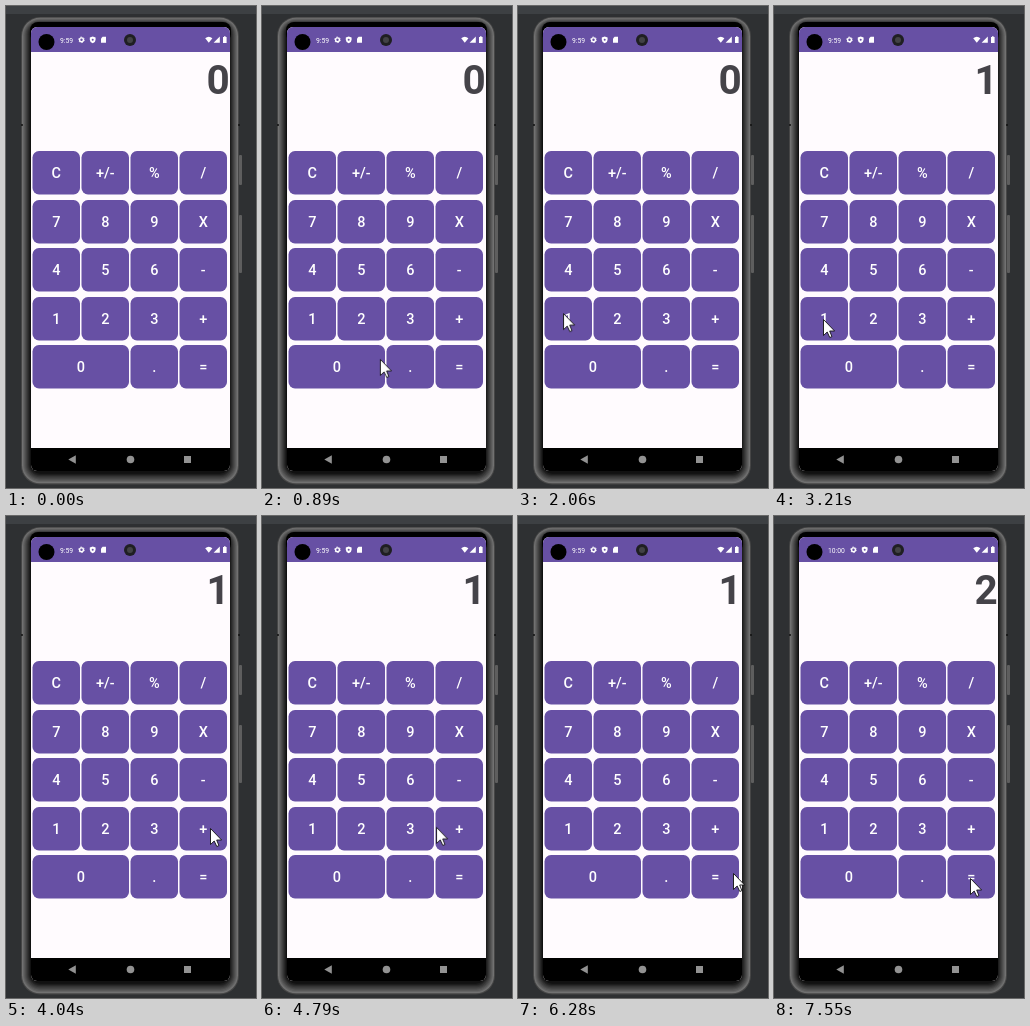
An HTML page for the animation above (8 s loop, 250x482 px).

```html
<!DOCTYPE html>
<html lang="en">
<head>
<meta charset="utf-8">
<title>Calculator</title>
<style>
html, body { margin: 0; width: 100%; height: 100%; overflow: hidden; background: #2e3032; }
svg { display: block; width: 250px; height: 482px; font-family: Roboto, sans-serif; }
#keys rect { fill: #6750a4; }
#keys text { fill: #fff; font-size: 14.5px; font-weight: 500; text-anchor: middle; }
.display { fill: #454349; font-size: 40.5px; font-weight: 700; text-anchor: end; }
.status { fill: #fff; font-size: 6.8px; }

.zero, .one, .two, .early, .late, .touch, .icons { animation: 8s step-end infinite; }
.zero { animation-name: zero; }
.one { animation-name: one; }
.two { animation-name: two; }
.early { animation-name: early; }
.late { animation-name: late; }
.touch { animation-name: touch; }
.icons { animation-name: icons; }
.cursor { animation: move 8s linear infinite; }

@keyframes zero { 0% { opacity: 1 } 40.125%, 100% { opacity: 0 } }
@keyframes one { 0% { opacity: 0 } 40.125% { opacity: 1 } 93.5%, 100% { opacity: 0 } }
@keyframes two { 0% { opacity: 0 } 93.5%, 100% { opacity: 1 } }
@keyframes early { 0% { opacity: 1 } 86.75%, 100% { opacity: 0 } }
@keyframes late { 0% { opacity: 0 } 86.75%, 100% { opacity: 1 } }
@keyframes icons { 0% { transform: none } 86.75%, 100% { transform: translateX(4px) } }
@keyframes touch {
  0%, 40.125%, 55.625%, 68.375%, 93.5%, 100% { opacity: 0 }
  38.5%, 53.125%, 66.75%, 91.875% { opacity: 1 }
}
@keyframes move {
  0%, 7.74% { transform: translate(216px, 520px) }
  7.75% { transform: translate(216px, 470px); animation-timing-function: cubic-bezier(.3, .5, .6, .9) }
  11.125% { transform: translate(118px, 353px); animation-timing-function: ease-out }
  12.875%, 16.125% { transform: translate(106px, 345px); animation-timing-function: ease-in-out }
  23.75% { transform: translate(40px, 296px) }
  25.75% { transform: translate(45px, 307px) }
  27.25%, 28.25% { transform: translate(49px, 316px) }
  30.625%, 43.5% { transform: translate(49px, 313px); animation-timing-function: ease-in }
  47.25% { transform: translate(132px, 324px); animation-timing-function: ease-out }
  50.5% { transform: translate(204px, 312px) }
  53.125%, 57.25% { transform: translate(199px, 311px); animation-timing-function: ease-in-out }
  66.75%, 70.75% { transform: translate(43px, 310px); animation-timing-function: ease-in-out }
  78.5%, 85.875% { transform: translate(215px, 357px); animation-timing-function: ease-out }
  89.375%, 100% { transform: translate(196px, 362px) }
}
</style>
</head>
<body>
<svg viewBox="0 0 250 482">
  <defs>
    <clipPath id="screen"><rect x="25" y="21" width="199" height="444" rx="6"/></clipPath>
  </defs>

  <rect width="250" height="482" fill="#2e3032"/>
  <rect width="250" height="8" fill="#3d4043"/>

  <!-- phone body -->
  <g fill="#5e5e5e">
    <rect x="233" y="149" width="3" height="30" rx="1"/>
    <rect x="233" y="209" width="3" height="58" rx="1"/>
  </g>
  <g id="body"></g>
  <rect x="24" y="16" width="201" height="20" rx="8"/>
  <path d="M15 119h2M232 119h2" stroke="#111" stroke-width="1.5"/>

  <g clip-path="url(#screen)">
    <rect x="25" y="21" width="199" height="444" fill="#fffbfe"/>
    <rect x="25" y="21" width="199" height="25" fill="#6750a4"/>
    <rect x="25" y="442" width="199" height="23" fill="#000"/>
  </g>
  <circle cx="40.5" cy="36" r="8"/>
  <circle cx="124" cy="34" r="6" fill="#1f1f22"/>
  <circle cx="124" cy="34" r="3" fill="#424246"/>

  <!-- status bar -->
  <text class="status early" x="54" y="36.5">9:59</text>
  <text class="status late" x="54" y="36.5">10:00</text>
  <g class="icons" fill="#fff">
    <circle cx="75.5" cy="33.8" r="1.9" fill="none" stroke="#fff" stroke-width="1.4"/>
    <circle cx="75.5" cy="33.8" r="2.8" fill="none" stroke="#fff" stroke-width=".9" stroke-dasharray="1.4 1.53"/>
    <path d="M86.7 30.4l2.9 1.1v2.2q0 2.4-2.9 3.6q-2.9-1.2-2.9-3.6v-2.2z"/>
    <circle cx="86.7" cy="33.8" r="1" fill="#6750a4"/>
    <path d="M96.6 30.8h3.4v6h-5v-4.4z"/>
  </g>
  <g fill="#fff">
    <path d="M199.2 32.2q3.6-3 7.2 0l-3.6 4.6z"/>
    <path d="M213.8 30.6v6.2h-6.2z"/>
    <path d="M217 31h1v-.8h1.6v.8h1v5.9h-3.6z"/>
  </g>

  <g class="display">
    <text class="zero" x="223.7" y="88.3">0</text>
    <text class="one" x="223.7" y="88.3">1</text>
    <text class="two" x="223.7" y="88.3">2</text>
  </g>
  <g id="keys"></g>

  <!-- navigation bar -->
  <g fill="#929292">
    <path d="M62.3 453.5l7.5-4.2v8.4z"/>
    <circle cx="124.5" cy="453.5" r="3.8"/>
    <rect x="178" y="450" width="7" height="7"/>
  </g>

  <g class="cursor">
    <circle class="touch" r="15" fill="#fff" fill-opacity=".3"/>
    <path d="M.5 .5V16.5L4.2 13L6.8 18.5L8.9 17.6L6.7 12H11.6Z" fill="#fff" stroke="#111" stroke-width=".9"/>
  </g>
</svg>
<script>
const body = document.getElementById('body');
const keys = document.getElementById('keys');
const rows = ['C +/- % /', '7 8 9 X', '4 5 6 -', '1 2 3 +', '0 . ='];

function add(parent, tag, attrs, text = '') {
  const node = document.createElementNS('http://www.w3.org/2000/svg', tag);
  for (const name in attrs) node.setAttribute(name, attrs[name]);
  node.textContent = text;
  parent.append(node);
}

// Rounded metal edge, darker towards the screen
for (let inset = 0; inset < 10; inset++) {
  const shade = inset ? 125 - inset * 12 : 70;
  add(body, 'rect', {
    x: 15 + inset, y: 11 + inset * .8,
    width: 218 - inset * 2, height: 467.5 - inset * 2,
    rx: 19 - inset, fill: `rgb(${shade}, ${shade}, ${shade})`
  });
}

rows.forEach((row, r) => {
  let col = 0;
  const y = Math.round(145 + r * 48.6);
  for (const label of row.split(' ')) {
    const span = label === '0' ? 2 : 1;
    const x = 26.5 + col * 49;
    const width = span * 49 - 1.5;
    add(keys, 'rect', { x, y, width, height: 43.5, rx: 6.5 });
    add(keys, 'text', { x: x + width / 2, y: y + 27 }, label);
    col += span;
  }
});
</script>
</body>
</html>
```
